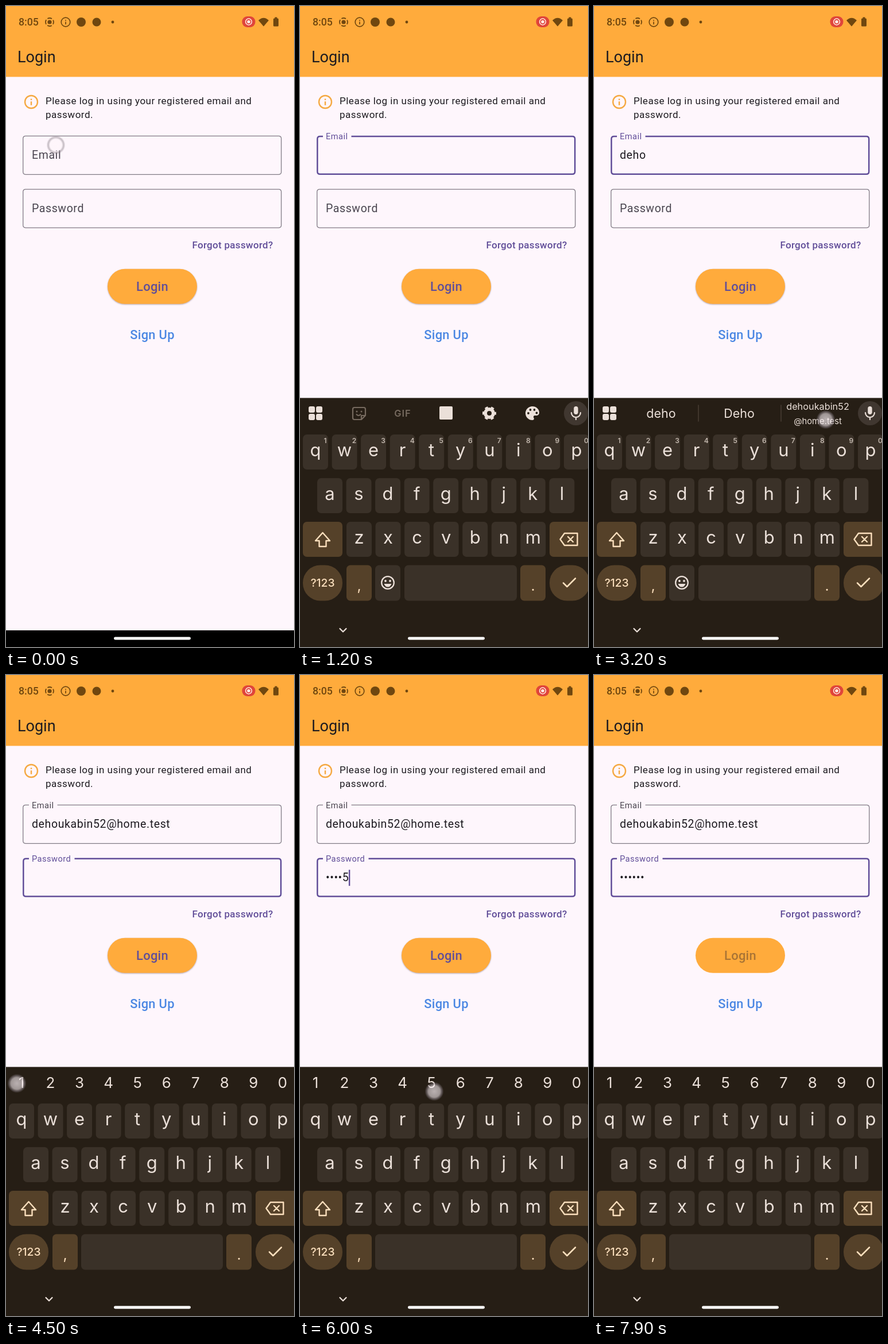
Recreate the animation shown at these times as an HTML page. Size 502 by 1116 pixels, loop 8 s.

```html
<!DOCTYPE html>
<html lang="en">
<head>
<meta charset="utf-8">
<title>Login form</title>
<style>
  html, body { margin: 0; width: 100%; height: 100%; overflow: hidden; background: #fef6fc; }
  svg { display: block; width: 502px; height: 1116px; }
  text { font-family: Roboto, sans-serif; white-space: pre; }
  .kb text { font-family: Inter, Roboto, sans-serif; }
  .line { fill: none; stroke-linecap: round; stroke-linejoin: round; }
  .body { font-size: 19.5px; letter-spacing: .61px; }
</style>
</head>
<body>
<svg id="stage" viewBox="0 0 502 1116" xmlns="http://www.w3.org/2000/svg"></svg>
<script>
const LOOP = 8000, TICK = 100;
const PURPLE = '#614e99', ORANGE = '#ffab3c', BROWN = '#70470f', INK = '#1d1b20';
const KB = '#261e15', KEY = '#3a3128', ACCENT = '#554129', LIGHT = '#ebe0d9', CREAM = '#fbdfbd', DIM = '#766a5f';
const USER = 'dehoukabin52', HOST = '@home.test', DIGITS = '123456';

// time, email, password length, focused field, suggestion strip
const steps = [
  [0, '', 0, '', 'icons'],
  [300, '', 0, 'email', 'icons'],
  [1400, 'd', 0, 'email', ['d', 'D', 'do']],
  [2000, 'de', 0, 'email', ['de', 'Dr', 'DR']],
  [2400, 'deh', 0, 'email', ['deh', 'Deh', 'DEH']],
  [2700, 'deho', 0, 'email', ['deho', 'Deho', '']],
  [3300, USER + HOST, 0, 'email', 'icons'],
  [3900, USER + HOST, 0, 'password', 'digits'],
  ...[4600, 5000, 5300, 5700, 6000, 6400].map((t, i) => [t, USER + HOST, i + 1, 'password', 'digits'])
];
// start, x, y, duration
const taps = [
  [0, 87, 242, 300], [1300, 157, 858], [1900, 147, 812], [2300, 311, 860], [2600, 437, 788],
  [3200, 404, 720], [3800, 190, 354], [4500, 19, 711], [4900, 82, 718], [5200, 134, 720],
  [5600, 184, 722], [5900, 234, 725], [6300, 285, 723], [7300, 258, 492]
];
const SLIDE = { from: 500, time: 300, height: 434 };
const SUBMIT = 7500;

const text = (x, y, s, size, fill, more = '') =>
  `<text x="${x}" y="${y}" font-size="${size}" fill="${fill}" ${more}>${s}</text>`;
const mid = 'text-anchor="middle"';
const rect = (x, y, w, h, r, fill, more = '') =>
  `<rect x="${x}" y="${y}" width="${w}" height="${h}" rx="${r}" fill="${fill}" ${more}/>`;
const dot = (x, y, r, fill) => `<circle cx="${x}" cy="${y}" r="${r}" fill="${fill}"/>`;
const ring = (x, y, r, color, w, more = '') =>
  `<circle cx="${x}" cy="${y}" r="${r}" fill="none" stroke="${color}" stroke-width="${w}" ${more}/>`;
const line = (d, color, w) => `<path class="line" d="${d}" stroke="${color}" stroke-width="${w}"/>`;
const info = (x, y, r, color, w) => ring(x, y, r, color, w) +
  rect(x - w / 2, y - r * .08, w, r * .6, 0, color) + rect(x - w / 2, y - r * .5, w, w, 0, color);

function statusBar() {
  return text(22, 34, '8:05', 17.7, BROWN, 'font-weight="500"') +
    ring(76, 28, 7, BROWN, 1.8, 'stroke-dasharray="8 3" stroke-dashoffset="4"') + dot(76, 28, 3.6, BROWN) +
    info(104, 28, 7.8, BROWN, 1.7) + dot(131, 28, 8, BROWN) + dot(158, 28, 7.5, BROWN) + dot(186, 28, 2.4, BROWN) +
    rect(411.5, 18, 23, 19, 9, '#e0453a') + ring(423, 27.5, 5.4, '#ffe9e4', 1.5) + dot(423, 27.5, 2.8, '#ffe9e4') +
    `<path d="M449 35.5L440 25Q449 16.5 458 25Z" fill="${BROWN}"/>` +
    rect(466, 21.5, 9, 14, 1.5, BROWN) + rect(468.5, 19.5, 4, 3, 0, BROWN);
}

function field(id, label, y) {
  return `<g transform="translate(0 ${y})"><path id="${id}Box" fill="none"/>
    <text id="${id}Label" class="body">${label}</text>
    <text id="${id}Text" class="body" x="45" y="39.7" fill="${INK}"></text>
    ${rect(45, 20, 2.4, 28, 0, PURPLE, `id="${id}Caret"`)}</g>`;
}

function page() {
  return rect(0, 0, 502, 1116, 0, '#fef6fc') + rect(0, 0, 502, 123.4, 0, ORANGE) + statusBar() +
    text(20, 98, 'Login', 27, INK) + info(44, 167, 11, '#f5a942', 2.4) +
    text(69, 170.5, 'Please log in using your registered email and', 17.05, INK, 'letter-spacing=".49"') +
    text(69, 195, 'password.', 17.05, INK, 'letter-spacing=".49"') +
    field('email', 'Email', 226.3) + field('password', 'Password', 319.1) +
    text(395, 422, 'Forgot password?', 17.05, PURPLE, mid + ' font-weight="500" letter-spacing=".28"') +
    rect(177, 457.7, 156, 61, 30.5, ORANGE, 'id="button"') +
    text(255, 495.7, 'Login', 21.9, PURPLE, mid + ' id="buttonText" font-weight="500" letter-spacing=".3"') +
    text(255, 579.7, 'Sign Up', 21.9, '#4a87e3', mid + ' font-weight="500" letter-spacing=".3"') +
    rect(0, 1087, 502, 29, 0, '#000');
}

const colX = i => 27 + 50.55 * i;

function letters(row, x0, y) {
  return [...row].map((c, i) => {
    const x = x0 + 50.55 * i;
    return rect(x - 22, y, 44, 61, 7, KEY) + text(x, y + 37.5, c, 31, LIGHT, mid);
  }).join('');
}

function toolbar() {
  const sticker = line('M95 699H111Q114 699 114 702V713L107 720H95Q92 720 92 717V702Q92 699 95 699ZM114 713H107V720', DIM, 2.2) +
    dot(99, 706, 1.5, DIM) + dot(107, 706, 1.5, DIM) + line('M98.5 711Q102 715 105.5 711', DIM, 2);
  const gear = ring(330, 709, 7, LIGHT, 6) + ring(330, 709, 10.3, LIGHT, 3.4, 'stroke-dasharray="5.4 5.386" stroke-dashoffset="2.7"');
  const palette = `<path d="M405 697A12 12 0 0 0 405 721Q408 721 408 718C406 715 407 713 410 713H413Q417 712 417 708A12 11 0 0 0 405 697Z" fill="${LIGHT}"/>` +
    [[398, 709], [401.5, 703], [408.5, 703], [412.5, 708.5]].map(([x, y]) => dot(x, y, 1.9, KB)).join('');
  return sticker + text(179, 715, 'GIF', 16.5, DIM, mid + ' font-weight="600" letter-spacing="1"') +
    rect(243, 697, 23, 23, 2, LIGHT) + gear + palette;
}

function keyboard() {
  const grid = [[15, 697], [28, 697], [15, 710], [28, 710]].map(([x, y]) => rect(x, y, 11, 11, 3, LIGHT)).join('');
  const mic = dot(481, 709, 21, '#403730') + rect(477.3, 697, 7.4, 14, 3.7, LIGHT) +
    line('M473 708A8 8 0 0 0 489 708M481 716V720', LIGHT, 2.2);
  const digits = [...'1234567890'];
  const words = [117, 253, 390].map((x, i) => text(x, 717, '', 21.5, LIGHT, `${mid} id="word${i}"`)).join('');
  return rect(0, 682.4, 502, 470, 0, KB) +
    `<g id="common">${grid + mic}</g><g id="icons">${toolbar()}</g>
    <g id="words">${words}${line('M182 695V723M326 695V723', '#4b4037', 1.4)}
      <g id="address">${text(390, 703, USER, 16.3, LIGHT, mid)}${text(390, 728, HOST, 14.8, LIGHT, mid)}</g></g>
    <g id="digits">${digits.map((d, i) => text(colX(i), 718.5, d, 26, LIGHT, mid)).join('')}</g>` +
    letters('qwertyuiop', 27, 746) + letters('asdfghjkl', 52, 822) + letters('zxcvbnm', 103, 898) +
    `<g id="hints">${digits.map((d, i) => text(colX(i) + 17, 760.5, d, 12, '#c3b8ae', mid + ' font-weight="600"')).join('')}</g>` +
    rect(5, 898, 69, 61, 7, ACCENT) + line('M39.5 917L52 931H45.5V941H33.5V931H27Z', CREAM, 2.4) +
    rect(435, 898, 74, 61, 7, ACCENT) + line('M453.5 928.5L461 918H483.5V939H461ZM467 924L476 933M476 924L467 933', CREAM, 2.4) +
    rect(5, 973.5, 69, 62, 30.5, ACCENT) + text(39.5, 1011, '?123', 19.3, CREAM, mid + ' font-weight="500"') +
    rect(81, 973.5, 44, 62, 7, ACCENT) + text(103, 1018, ',', 25, CREAM, mid) +
    rect(182, 973.5, 196, 62, 7, KEY, 'id="space"') +
    `<g id="emoji">${rect(131, 973.5, 44, 62, 7, KEY) + ring(153, 1004, 10.8, LIGHT, 2.3) + dot(149, 1001, 1.9, LIGHT) + dot(157, 1001, 1.9, LIGHT)}
      <path d="M146.5 1006H159.5Q157.5 1011.5 153 1011.5T146.5 1006Z" fill="${LIGHT}"/></g>` +
    rect(384, 973.5, 44, 62, 7, ACCENT) + text(406, 1018, '.', 25, CREAM, mid) +
    rect(435, 973.5, 70, 62, 30.5, ACCENT) + line('M459 1004.5L465.5 1011L480 996.5', CREAM, 2.5) +
    line('M69.5 1084L75 1089.5L80.5 1084', LIGHT, 2.2);
}

const stage = document.getElementById('stage');
stage.innerHTML = `<defs><radialGradient id="glow">
    <stop offset="0" stop-color="#fff5fa" stop-opacity=".68"/><stop offset=".62" stop-color="#fff5fa" stop-opacity=".56"/>
    <stop offset=".82" stop-color="#8a8088" stop-opacity=".5"/><stop offset="1" stop-color="#8a8088" stop-opacity="0"/>
  </radialGradient></defs>${page()}<g id="kb" class="kb">${keyboard()}</g>
  ${rect(188, 1098.6, 134, 4.9, 2.4, '#fff')}<circle id="touch" r="16.5" fill="url(#glow)"/>`;

const ui = {};
stage.querySelectorAll('[id]').forEach(el => ui[el.id] = el);
const set = (id, attrs) => { for (const k in attrs) ui[id].setAttribute(k, attrs[k]); };
const show = (id, on) => { ui[id].style.display = on ? '' : 'none'; };
const clamp = v => Math.max(0, Math.min(1, v));
const ease = p => p * p * (3 - 2 * p);

function drawField(id, value, focused, caret, openAt, gapEnd, t) {
  const p = ease(clamp((t - openAt) / 167));
  const i = focused ? .6 : 0, l = 29.7 + i, r = 479.8 - i, b = 67 - i, c = 4.5;
  const gap = 40 + (gapEnd - 40) * p;
  set(id + 'Box', {
    d: `M${gap} ${i}H${r - c}Q${r} ${i} ${r} ${i + c}V${b - c}Q${r} ${b} ${r - c} ${b}H${l + c}Q${l} ${b} ${l} ${b - c}V${i + c}Q${l} ${i} ${l + c} ${i}H40`,
    stroke: focused ? PURPLE : '#817b85', 'stroke-width': focused ? 2.5 : 1.3
  });
  set(id + 'Label', {
    transform: `translate(45 ${39.7 - 34.2 * p}) scale(${1 - .25 * p})`,
    fill: focused ? PURPLE : '#49454f'
  });
  ui[id + 'Text'].textContent = value;
  show(id + 'Caret', caret);
  if (caret) set(id + 'Caret', { x: 44.6 + (value ? ui[id + 'Text'].getComputedTextLength() : 0) });
}

function draw(t) {
  const [since, email, count, focus, strip] = steps.filter(s => s[0] <= t).pop();
  const blink = Math.floor((t - since) / 500) % 2 === 0;
  const peek = count && t - since < 1500;
  const pass = '•'.repeat(peek ? count - 1 : count) + (peek ? DIGITS[count - 1] : '');
  drawField('email', email, focus === 'email', focus === 'email' && blink, 300, 89.5, t);
  drawField('password', pass, focus === 'password', focus === 'password' && blink, 3900, 119.5, t);

  const sent = t >= SUBMIT;
  ui.button.style.filter = sent ? 'none' : 'drop-shadow(0 1.4px 1.2px rgba(60,40,60,.38))';
  set('buttonText', { fill: sent ? '#a97435' : PURPLE });

  const numeric = strip === 'digits', words = Array.isArray(strip);
  show('common', !numeric);
  show('icons', strip === 'icons');
  show('words', words);
  show('digits', numeric);
  show('hints', !numeric);
  show('emoji', !numeric);
  set('space', numeric ? { x: 131, width: 247 } : { x: 182, width: 196 });
  if (words) strip.forEach((w, i) => ui['word' + i].textContent = w);
  show('address', words && !strip[2]);

  const left = Math.pow(1 - clamp((t - SLIDE.from) / SLIDE.time), 2.32);
  set('kb', { transform: `translate(0 ${SLIDE.height * left})` });
  show('kb', left < 1);

  const tap = taps.find(([at, , , time = 200]) => t >= at && t < at + time);
  show('touch', tap);
  if (tap) set('touch', { cx: tap[1], cy: tap[2] });
}

const start = performance.now();
function frame() {
  const t = (performance.now() - start) % LOOP;
  draw(Math.floor(t / TICK) * TICK);
  requestAnimationFrame(frame);
}
frame();
</script>
</body>
</html>
```
